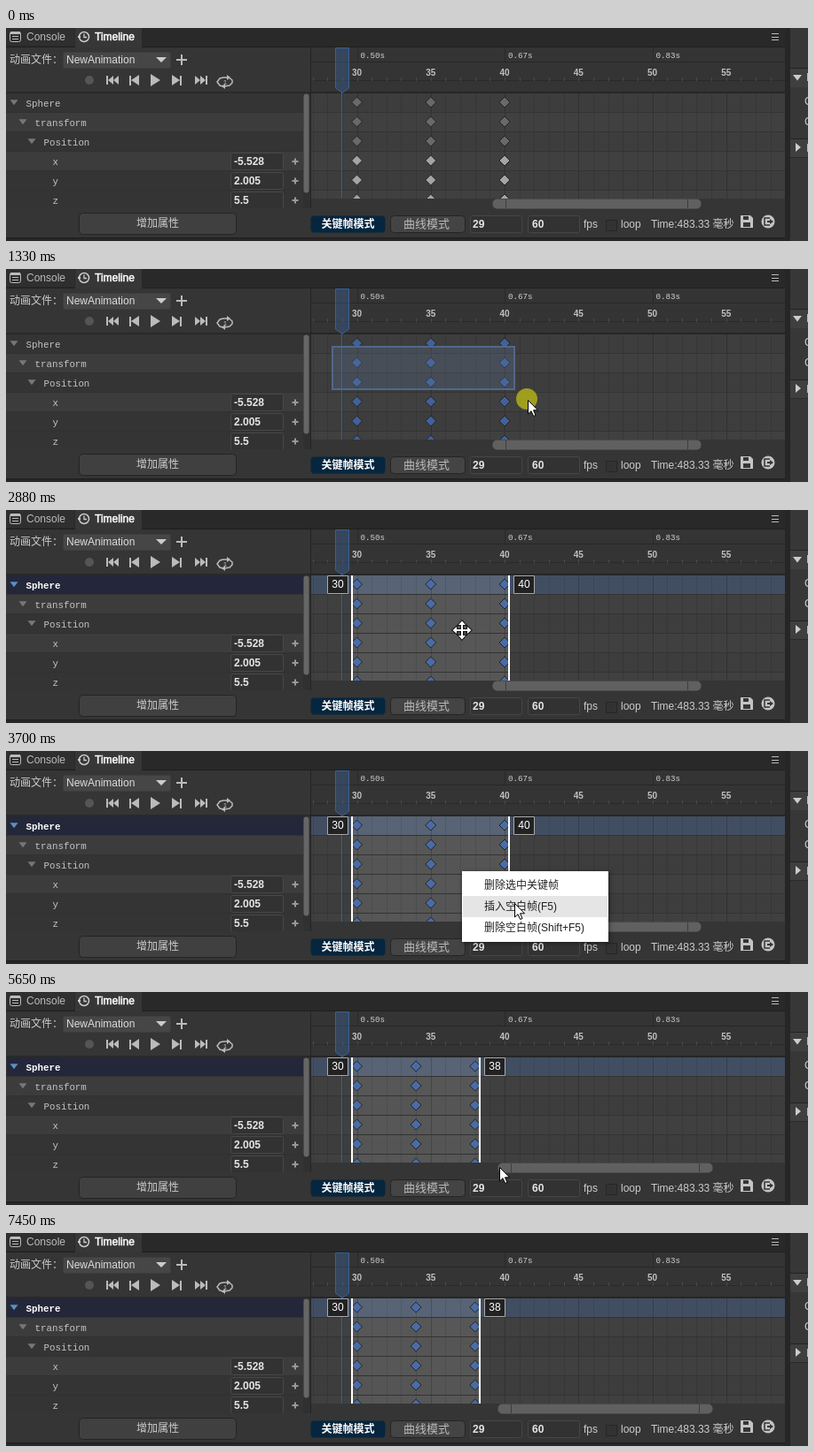
An HTML page with a canvas for the animation above (7.93 s loop, 904 px wide and 241 px high).

```html
<!DOCTYPE html>
<html lang="zh">
<head>
<meta charset="utf-8">
<title>Timeline</title>
<style>
html, body { margin: 0; width: 100%; height: 100%; overflow: hidden; background: #333; }
canvas { display: block; }
</style>
</head>
<body>
<canvas id="stage" width="904" height="241"></canvas>
<script>
const ctx = document.getElementById('stage').getContext('2d');
const LOOP = 7930, STEP = 70;
const SANS = '"Liberation Sans", "Noto Sans CJK SC", "Noto Sans CJK", sans-serif';
const MONO = '"Liberation Mono", monospace';
const ROWS = [84, 106, 128, 150, 172, 194];
const TRACK = { left: 344, right: 878, top: 74, bottom: 193 };
const DRAG = 850, RELEASE = 1680, PICK = 2460, SELECT = 2530, MENU = 3080, CLICK = 5450, APPLY = 5520, GONE = 7450;

// Spans of time in which the pointer moves, and its path [ms, x, y].
const SPANS = [[70, 630], [850, 1610], [1680, 2240], [2460, 3150], [3280, 3700],
  [4440, 4440], [4640, 4920], [5450, 6080], [6230, 6970], [7040, 7450]];
const PATH = [[70, 630, 187], [630, 368, 88], [850, 368, 88], [1260, 573, 136], [1330, 588, 148],
  [1610, 595, 183], [1680, 596, 183], [2240, 532, 92], [2530, 532, 92], [2870, 514, 136],
  [3210, 514, 136], [3700, 573, 172], [4440, 566, 158], [4570, 566, 158], [4920, 556, 200],
  [5520, 556, 200], [6080, 553, 158], [6160, 553, 158], [6480, 502, 143], [6970, 459, 136],
  [7040, 452, 134], [7450, 800, 250]];

const frameX = n => 395.5 + (n - 30) * 16.65;

function rect(x, y, w, h, fill) {
  ctx.fillStyle = fill;
  ctx.fillRect(x, y, w, h);
}

function box(x, y, w, h, fill, stroke, radius = 0) {
  ctx.beginPath();
  ctx.roundRect(x + .5, y + .5, w - 1, h - 1, radius);
  ctx.fillStyle = fill;
  ctx.fill();
  if (stroke) {
    ctx.strokeStyle = stroke;
    ctx.lineWidth = 1;
    ctx.stroke();
  }
}

function text(str, x, mid, color = '#ccc', font = '12px ' + SANS, align = 'left') {
  ctx.font = font;
  ctx.textAlign = align;
  ctx.fillStyle = color;
  ctx.fillText(str, x, mid + 4);
}

function poly(points, fill, stroke, width = 1) {
  ctx.beginPath();
  points.forEach(([x, y]) => ctx.lineTo(x, y));
  ctx.closePath();
  if (fill) { ctx.fillStyle = fill; ctx.fill(); }
  if (stroke) { ctx.strokeStyle = stroke; ctx.lineWidth = width; ctx.stroke(); }
}

function line(points, color, width = 1) {
  ctx.beginPath();
  points.forEach(([x, y]) => ctx.lineTo(x, y));
  ctx.strokeStyle = color;
  ctx.lineWidth = width;
  ctx.stroke();
}

function circle(x, y, r, fill, stroke, width = 1.5) {
  ctx.beginPath();
  ctx.arc(x, y, r, 0, 7);
  if (fill) { ctx.fillStyle = fill; ctx.fill(); }
  if (stroke) { ctx.strokeStyle = stroke; ctx.lineWidth = width; ctx.stroke(); }
}

const triRight = (x, y, w, h, c) => poly([[x, y - h], [x + w, y], [x, y + h]], c);
const triDown = (x, y, r, c) => poly([[x - r, y - r * .6], [x + r, y - r * .6], [x, y + r * .7]], c);

function plus(x, y, r, color) {
  rect(x - r, y - 1, 2 * r, 2, color);
  rect(x - 1, y - r, 2, 2 * r, color);
}

function drawTabs() {
  rect(0, 0, 904, 241, '#353535');
  rect(0, 0, 879, 21, '#292929');
  rect(0, 0, 77, 20, '#2f2f2f');
  rect(78, 0, 75, 22, '#373737');
  rect(0, 21, 78, 1, '#1f1f1f');
  rect(153, 21, 726, 1, '#1f1f1f');
  box(4, 4, 13, 12, '#2f2f2f', '#bbb', 2);
  rect(5, 4, 11, 3, '#bbb');
  [9, 12].forEach(y => rect(7, y, 7, 1, '#bbb'));
  text('Console', 23, 10, '#bbb');
  circle(88, 10, 5.5, null, '#ccc');
  line([[88, 6.5], [88, 10.5], [91, 10.5]], '#ccc', 1.3);
  line([[81, 10], [84, 10]], '#ccc', 2);
  text('Timeline', 100, 10, '#fff');
  ctx.strokeStyle = '#fff';
  ctx.lineWidth = .5;
  ctx.strokeText('Timeline', 100, 14);
  [6, 10, 13].forEach(y => rect(863, y, 8, 1, '#bbb'));
}

function drawTransport() {
  const c = '#bbb';
  text('动画文件：', 4, 36);
  box(64, 27, 122, 19, '#464646', '#3d3d3d', 2);
  text('NewAnimation', 68, 36, '#ddd');
  poly([[169, 33], [181, 33], [175, 39]], '#ccc');
  plus(198, 36, 6, '#bbb');
  circle(94, 59, 5, '#555');
  rect(113, 54, 2, 10, c);
  poly([[121, 59], [127, 54], [127, 64]], c);
  poly([[115, 59], [121, 54], [121, 64]], c);
  rect(139, 54, 2, 11, c);
  poly([[141, 59], [150, 53], [150, 65]], c);
  triRight(163, 59, 11, 7, c);
  triRight(187, 59, 9, 6, c);
  rect(196, 54, 2, 11, c);
  triRight(213, 59, 6, 5, c);
  triRight(219, 59, 6, 5, c);
  rect(225, 54, 2, 10, c);
  line([[245, 66], [241, 65], [238, 61], [241, 57], [245, 56], [250, 56]], c, 1.5);
  line([[252, 56.5], [255, 59], [255, 62], [252, 65], [246, 66]], c, 1.5);
  triRight(249, 56, 4, 3, c);
  poly([[247, 63], [247, 69], [243, 66]], c);
  text('1', 247, 60, c, '8px ' + SANS, 'center');
}

function drawTree(selected) {
  rect(0, 72, 344, 2, '#292929');
  ROWS.forEach((y, i) => {
    rect(0, y - 10, 335, i === 5 ? 20 : 22, i === 1 || i === 3 ? '#3c3c3c' : '#343434');
    rect(0, y + 11, 335, 1, '#313131');
  });
  if (selected) rect(1, 74, 334, 21, '#24273a');
  const label = (str, x, y, color = '#c4c4c4', weight = '') => text(str, x - .5, y, color, weight + '10.8px ' + MONO);
  triDown(9, 84, 4.5, selected ? '#5c8fc4' : '#777');
  label('Sphere', 23, 85, selected ? '#fff' : '#c4c4c4', selected ? 'bold ' : '');
  triDown(19, 106, 4.5, '#777');
  label('transform', 33, 107);
  triDown(29, 128, 4.5, '#777');
  label('Position', 43, 129);
  [['x', '-5.528'], ['y', '2.005'], ['z', '5.5']].forEach(([name, value], i) => {
    const y = ROWS[i + 3];
    label(name, 53, y + 1);
    box(253, y - 9, 60, 20, '#323232', '#484848', 2);
    text(value, 257, y + 1, '#e4e4e4', 'bold 12px ' + SANS);
    plus(326, y + 1, 3.5, '#999');
  });
  rect(0, 204, 343, 33, '#353535');
  rect(335, 74, 8, 130, '#303030');
  box(335, 74, 7, 113, '#666', null, 3);
  rect(343, 22, 1, 182, '#232323');
}

function drawRuler() {
  rect(344, 22, 534, 51, '#343434');
  rect(344, 38, 534, 1, '#272727');
  rect(344, 59, 534, 1, '#2a2a2a');
  for (let n = 27; n <= 58; n++) {
    const x = Math.round(frameX(n));
    if (x > 877) break;
    rect(x, 56, 1, 4, '#4a4a4a');
    if (n % 5 === 0) text(n, frameX(n), 50, '#c0c0c0', 'bold 10px ' + SANS, 'center');
  }
  [['0.50s', 30], ['0.67s', 40], ['0.83s', 50]].forEach(([str, n]) => {
    rect(Math.round(frameX(n)), 22, 1, 16, '#2a2a2a');
    text(str, frameX(n) + 4, 30, '#d0d0d0', '9.2px ' + MONO);
  });
}

function diamond(x, y, fill) {
  poly([[x, y - 6], [x + 6, y], [x, y + 6], [x - 6, y]], fill, '#242424');
}

function rangeLabel(n, x) {
  box(x, 74, 24, 21, '#222', '#aaa');
  text(n, x + 12, 84, '#fff', '12px ' + SANS, 'center');
}

function drawTracks(selected, keys, isBlue) {
  const { left, right, top, bottom } = TRACK, width = right - left;
  const first = frameX(30) - 5.5, last = frameX(keys[2]) + 5;
  ctx.save();
  ctx.beginPath();
  ctx.rect(left, 72, width, bottom - 72);
  ctx.clip();
  rect(left, 72, width, 2, '#262626');
  ROWS.forEach((y, i) => rect(left, y - 10, width, 22, i % 2 ? '#404040' : '#3d3d3d'));
  if (selected) {
    rect(left, top, width, 21, '#414e62');
    rect(first, top, last - first, 120, 'rgba(255,255,255,.12)');
  }
  for (let n = 27; n <= 58; n++) rect(Math.round(frameX(n)), top, 1, 120, n % 5 ? 'rgba(0,0,0,.1)' : 'rgba(0,0,0,.2)');
  ROWS.forEach(y => rect(left, y + 11, width, 1, '#333'));
  ROWS.forEach((y, row) => keys.forEach(n => {
    diamond(frameX(n), y, isBlue(frameX(n)) ? selected ? '#4a6ca6' : '#41619a' : row < 3 ? '#696969' : '#a4a4a4');
  }));
  rect(378, 72, 1, 122, '#35629c');
  if (selected) {
    rect(Math.round(first) - 1, top, 2, 120, '#fff');
    rect(Math.round(last) - 1, top, 2, 120, '#fff');
    rangeLabel(30, 362);
    rangeLabel(keys[2], Math.round(last) + 5);
  }
  ctx.restore();
  poly([[371.5, 22.5], [386.5, 22.5], [386.5, 68], [379, 73.5], [371.5, 68]], 'rgba(60,98,150,.4)', '#35629c');
}

function drawFooter(trimmed) {
  rect(344, 193, 534, 44, '#353535');
  const x = trimmed ? 554 : 548, w = trimmed ? 243 : 236;
  box(x, 193, w, 12, '#606060', null, 5);
  rect(x + 15, 194, 1, 10, '#3d3d3d');
  rect(x + w - 16, 194, 1, 10, '#3d3d3d');
  box(82, 209, 178, 25, '#404040', '#242424', 4);
  text('增加属性', 171, 221, '#ccc', '12px ' + SANS, 'center');
  box(343, 212, 85, 20, '#06263f', null, 4);
  text('关键帧模式', 385.5, 222, '#fff', 'bold 12px ' + SANS, 'center');
  box(433, 212, 85, 20, '#444', '#242424', 4);
  text('曲线模式', 474, 222, '#bbb', '13px ' + SANS, 'center');
  [[523, '29', 526], [588, '60', 593]].forEach(([bx, str, tx]) => {
    box(bx, 212, 59, 20, '#323232', '#464646', 2);
    text(str, tx, 222, '#e4e4e4', 'bold 12px ' + SANS);
  });
  text('fps', 651, 222);
  box(676, 217, 13, 13, '#323232', '#262626');
  text('loop', 693, 222);
  text('Time:483.33 毫秒', 727, 222);
  poly([[828, 212], [839, 212], [842, 215], [842, 226], [828, 226]], '#c4c4c4');
  rect(831, 213, 6, 4, '#353535');
  rect(831, 220, 8, 5, '#353535');
  circle(859, 219, 7.5, '#c4c4c4');
  line([[861, 215], [855, 215], [855, 223], [861, 223]], '#353535', 1.5);
  rect(858, 218, 4, 2, '#353535');
  triRight(861, 219, 4, 3, '#353535');
  rect(0, 237, 884, 4, '#2a2626');
  rect(0, 237, 884, 1, '#1d1d1d');
}

function drawSide() {
  rect(878, 0, 6, 241, '#262626');
  rect(884, 0, 20, 241, '#373737');
  rect(884, 45, 20, 1, '#222');
  rect(884, 46, 20, 21, '#3f3f3f');
  rect(884, 125, 20, 1, '#222');
  rect(884, 126, 20, 20, '#3f3f3f');
  rect(884, 146, 20, 1, '#2a2a2a');
  triDown(892, 56, 5, '#ccc');
  triRight(890, 135, 6, 5, '#ccc');
  rect(903, 51, 1, 9, '#bbb');
  rect(903, 131, 1, 9, '#bbb');
  text('C', 900, 83, '#ccc');
  text('C', 900, 106, '#ccc');
}

function drawMenu(y) {
  ctx.save();
  ctx.shadowColor = 'rgba(0,0,0,.5)';
  ctx.shadowBlur = 5;
  ctx.shadowOffsetX = ctx.shadowOffsetY = 1;
  rect(514, 136, 165, 80, '#fff');
  ctx.restore();
  ['删除选中关键帧', '插入空白帧(F5)', '删除空白帧(Shift+F5)'].forEach((str, i) => {
    const top = 140 + i * 24;
    if (y >= top && y < top + 24) rect(515, top, 163, 24, '#e5e5e5');
    text(str, 539, top + 12, '#222');
  });
}

function drawPointer(x, y, cross) {
  ctx.save();
  ctx.translate(x, y);
  if (cross) {
    const arm = [[-1, -1], [-1, -6], [-4, -6], [0, -10.5], [4, -6], [1, -6]];
    const shape = [0, 1, 2, 3].flatMap(k => arm.map(([a, b]) =>
      [[a, b], [-b, a], [-a, -b], [b, -a]][k]));
    poly(shape, '#fff', '#111', 2);
    poly(shape, '#fff');
  } else {
    poly([[.5, .5], [.5, 16], [4, 12.7], [6.7, 18.5], [9, 17.5], [6.5, 11.8], [11.5, 11.8]], '#fff', '#000');
  }
  ctx.restore();
}

function pointerAt(t) {
  const i = PATH.findIndex(p => p[0] > t);
  if (i < 1) return PATH[i < 0 ? PATH.length - 1 : 0].slice(1);
  const [t0, x0, y0] = PATH[i - 1], [t1, x1, y1] = PATH[i];
  const u = (t - t0) / (t1 - t0), ease = u * u * (3 - 2 * u);
  return [x0 + (x1 - x0) * ease, y0 + (y1 - y0) * ease].map(Math.round);
}

function stepTime(t) {
  const [start, end] = SPANS.filter(s => s[0] <= t).pop() || SPANS[0];
  return t >= end ? end : Math.max(start, end - Math.ceil((end - t) / STEP) * STEP);
}

function draw(t) {
  const now = stepTime(t), [x, y] = pointerAt(now);
  const selected = t >= SELECT, trimmed = t >= APPLY;
  const dragging = t >= DRAG && t < RELEASE;
  const menu = t >= MENU && t < APPLY;
  const [dragX, dragY] = pointerAt(Math.max(DRAG, now - STEP));
  const isBlue = kx => t >= RELEASE || dragging && dragX > kx - 6 && dragY > 100;

  drawTabs();
  drawTransport();
  drawTree(selected);
  drawRuler();
  drawTracks(selected, trimmed ? [30, 34, 38] : [30, 35, 40], isBlue);
  drawFooter(trimmed);
  drawSide();

  if (dragging && dragX > 369) {
    ctx.fillStyle = 'rgba(90,115,150,.28)';
    ctx.fillRect(368, 88, dragX - 368, dragY - 88);
    ctx.strokeStyle = '#52678a';
    ctx.lineWidth = 2;
    ctx.strokeRect(368, 88, dragX - 368, dragY - 88);
  }
  if (menu) drawMenu(y);
  if (t < 70 || t >= GONE) return;
  const pressed = dragging || t >= PICK && t < SELECT || t >= CLICK && t < APPLY;
  if (pressed) circle(x - 1, y - 1, 12, 'rgba(178,178,24,.83)');
  const inRange = x > 390 && x < (trimmed ? 534 : 567) && y > 74 && y < 193;
  drawPointer(x, y, selected && !menu && inRange);
}

const begin = performance.now();
function tick() {
  draw((performance.now() - begin) % LOOP);
  requestAnimationFrame(tick);
}
tick();
</script>
</body>
</html>
```
